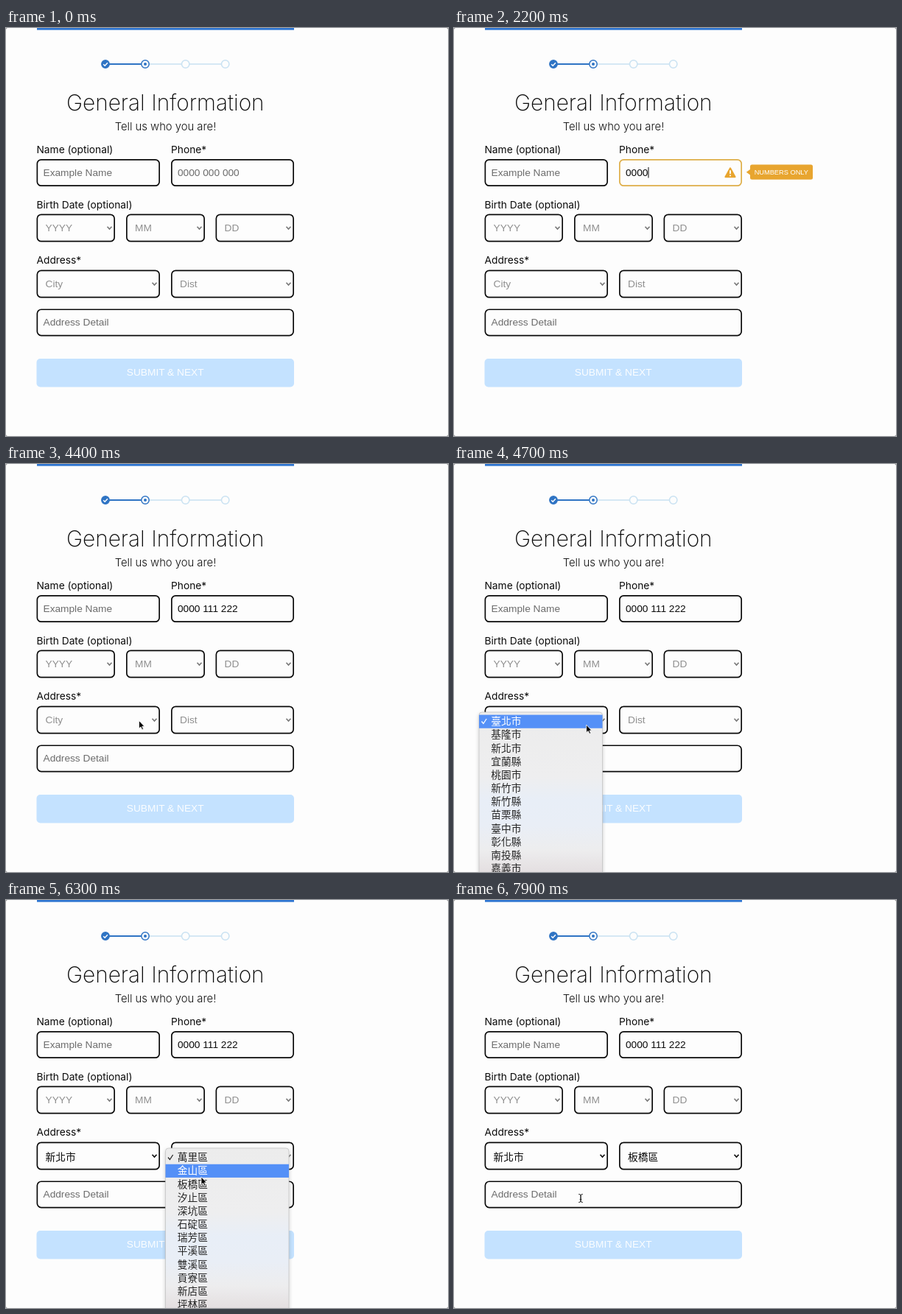
Recreate the animation shown at these times as an HTML page. Size 600 by 554 pixels, loop 8 s.

```html
<!DOCTYPE html>
<html lang="en">
<head>
<meta charset="utf-8">
<title>General Information form</title>
<style>
  html, body { margin: 0; width: 100%; height: 100%; overflow: hidden; background: #fdfdfd; }
  svg { display: block; width: 600px; height: 554px; }
  text { font-family: "Liberation Sans", Arial, "Noto Sans CJK TC", sans-serif; font-size: 13.7px; white-space: pre; }
  .label { font-family: Inter, sans-serif; font-size: 13.75px; fill: #0a0a0a; }
  .title { font-family: Inter, sans-serif; font-size: 29.8px; font-weight: 200; fill: #0a0a0a; }
  .sub { font-family: Inter, sans-serif; font-size: 14.8px; font-weight: 300; fill: #111; }
  .mid { text-anchor: middle; }
  .cjk { font-family: "Noto Sans CJK TC", "Noto Sans CJK", sans-serif; }
</style>
</head>
<body>
<svg id="stage" viewBox="0 0 600 554"></svg>
<script>
const LOOP = 8000, STEP = 100;
const BLUE = '#2f74c4', PALE = '#c9e2f2', AMBER = '#e8a52f';
const HINT = '#6c6c6c', FAINT = '#8f8f8f', INK = '#0a0a0a';
const ROW = 18.15, LIST_TOP = 340.6;
const PHONE = '0000 111 222';
const CITIES = '臺北市 基隆市 新北市 宜蘭縣 桃園市 新竹市 新竹縣 苗栗縣 臺中市 彰化縣 南投縣 嘉義市'.split(' ');
const DISTRICTS = '萬里區 金山區 板橋區 汐止區 深坑區 石碇區 瑞芳區 平溪區 雙溪區 貢寮區 新店區 坪林區'.split(' ');
const stage = document.getElementById('stage');

function add(tag, attrs, parent = stage) {
  const el = document.createElementNS('http://www.w3.org/2000/svg', tag);
  return parent.appendChild(set(el, attrs));
}
function set(el, attrs) {
  for (const k in attrs) el.setAttribute(k, attrs[k]);
  return el;
}
function write(text, x, y, attrs, parent) {
  const el = add('text', { x, y, ...attrs }, parent);
  el.textContent = text;
  return el;
}
function show(el, visible) { el.setAttribute('visibility', visible ? 'visible' : 'hidden'); }

function field(x, y, w, h = 37) {
  return add('rect', {
    x: x + .85, y: y + .85, width: w - 1.7, height: h - 1.7, rx: 5.5,
    fill: '#fdfdfd', stroke: INK, 'stroke-width': 1.7
  });
}
function input(x, y, w, hint) {
  const box = field(x, y, w);
  return { box, text: write(hint, x + 9, y + 22.7, { fill: HINT }) };
}
function select(x, y, w, hint) {
  field(x, y, w, 38);
  const text = write(hint, x + 12, y + 23.5, { fill: FAINT });
  const arrow = add('path', {
    d: `M${x + w - 10.5} ${y + 17.3}l3 3.2l3-3.2`,
    fill: 'none', stroke: '#777', 'stroke-width': 1.6
  });
  return {
    update(value) {
      text.textContent = value || hint;
      set(text, { fill: value ? INK : FAINT, class: value ? 'cjk' : '', y: y + (value ? 25.5 : 23.5) });
      arrow.setAttribute('stroke', value ? INK : '#777');
    }
  };
}

function menu(x, items) {
  const g = add('g', {});
  add('rect', { x, y: 337, width: 167.5, height: 240, rx: 4, fill: 'url(#menuFill)', stroke: '#bdbdbd', 'stroke-width': .7, filter: 'url(#soft)' }, g);
  const bar = add('rect', { x, width: 167.5, height: ROW, fill: '#5490f7' }, g);
  const tick = add('path', { d: `M${x + 3.5} 349.5l2.4 3l4.2-6.5`, fill: 'none', 'stroke-width': 1.3 }, g);
  const rows = items.map((name, i) =>
    write(name, x + 16.3, LIST_TOP + i * ROW + 13.7, { class: 'cjk' }, g));
  return {
    update(opacity, y) {
      show(g, opacity > 0);
      g.setAttribute('opacity', opacity);
      const active = Math.max(0, Math.floor((y - LIST_TOP) / ROW));
      bar.setAttribute('y', LIST_TOP + active * ROW);
      rows.forEach((row, i) => row.setAttribute('fill', i === active ? '#fff' : '#262626'));
      tick.setAttribute('stroke', active ? '#262626' : '#fff');
    }
  };
}

// Page
add('defs', {}).innerHTML = `
  <linearGradient id="menuFill" x1="0" y1="337" x2="0" y2="577" gradientUnits="userSpaceOnUse">
    <stop offset="0" stop-color="#ececec"/><stop offset=".36" stop-color="#eeeeef"/>
    <stop offset=".5" stop-color="#e8eef7"/><stop offset=".64" stop-color="#e9eef6"/>
    <stop offset=".78" stop-color="#ededee"/><stop offset=".9" stop-color="#e4dfe1"/>
  </linearGradient>
  <filter id="soft" x="-10%" y="-10%" width="120%" height="120%">
    <feDropShadow dx="0" dy="2" stdDeviation="2.5" flood-opacity=".2"/>
  </filter>`;
add('rect', { width: 600, height: 554, fill: '#8c8c8c' });
add('rect', { width: 600, height: 554, rx: 2.5, fill: '#fdfdfd' });
add('rect', { x: 42, width: 349, height: 2.7, fill: '#2f76d2' });

// Progress steps
add('path', { d: 'M189 49H298', stroke: PALE, 'stroke-width': 1.6 });
add('path', { d: 'M135 49H189', stroke: BLUE, 'stroke-width': 1.8 });
[135, 189, 243.7, 297.7].forEach((cx, i) => add('circle', {
  cx, cy: 49, r: 5.2, fill: i ? '#fdfdfd' : BLUE, stroke: i < 2 ? BLUE : PALE, 'stroke-width': 1.5
}));
add('path', { d: 'M132.2 49.2l2 2l3.7-4', fill: 'none', stroke: '#fff', 'stroke-width': 1.5 });
add('circle', { cx: 189, cy: 49, r: 2, fill: BLUE });

write('General Information', 216.3, 112, { class: 'title mid' });
write('Tell us who you are!', 216.5, 138.5, { class: 'sub mid' });
[['Name (optional)', 41.5, 169.5], ['Phone*', 224, 169.5], ['Birth Date (optional)', 41.5, 244.7], ['Address*', 41.5, 320]]
  .forEach(([name, x, y]) => write(name, x, y, { class: 'label' }));

input(41.5, 178, 167.5, 'Example Name');
const phone = input(224, 178, 167, '');
select(41.5, 252.5, 106.5, 'YYYY');
select(163, 252.5, 107, 'MM');
select(284.5, 252.5, 106.5, 'DD');
const city = select(41.5, 328.5, 167.5, 'City');
const district = select(224, 328.5, 167, 'Dist');
input(41.5, 381.4, 349.5, 'Address Detail');
add('rect', { x: 41.5, y: 449, width: 349.5, height: 38.5, rx: 5, fill: '#c4e2ff' });
write('SUBMIT & NEXT', 216.2, 472.3, { class: 'mid', fill: '#fbfdff' });

const caret = add('path', { stroke: INK, 'stroke-width': 1 });
const warning = add('g', {});
add('path', { d: 'M375 190.3L381.6 202.2H368.4Z', fill: AMBER, stroke: AMBER, 'stroke-width': 2, 'stroke-linejoin': 'round' }, warning);
add('path', { d: 'M375 193.2V198M375 199.5V201.3', stroke: '#fff', 'stroke-width': 1.8 }, warning);
add('path', { d: 'M396.8 195.7L403 191.2V200.2Z', fill: AMBER }, warning);
add('rect', { x: 402, y: 185.4, width: 85, height: 20.4, rx: 2.5, fill: AMBER }, warning);
write('NUMBERS ONLY', 444.3, 199, { class: 'mid', fill: '#fff', style: 'font-size:9.25px' }, warning);

const cityMenu = menu(34, CITIES), districtMenu = menu(216.5, DISTRICTS);

const pointer = add('path', { d: 'M0 0V10.6L2.5 8.4L4.2 12.2L6 11.4L4.3 7.8H7.4Z', fill: '#000', stroke: '#fff', 'stroke-width': .8 });
const beam = add('path', { d: 'M-2.8-5.5Q0-5.5 0-4V4Q0 5.5-2.8 5.5M2.8-5.5Q0-5.5 0-4V4Q0 5.5 2.8 5.5M-1.3 1.5H1.3', fill: 'none', stroke: '#222', 'stroke-width': 1 });

// Motion: [time, x, y]
const PATH = [
  [100, 285, 560], [800, 300, 198], [3300, 300, 198], [3600, 285, 240], [4300, 180.5, 348.5],
  [4600, 180.5, 348.5], [5000, 175, 384.5], [5400, 175, 384.5], [5900, 262, 349], [6100, 262, 350],
  [6300, 265, 376], [6600, 265, 384.5], [7200, 265, 384.5], [7800, 172, 405], [8000, 172, 405]
];
const clamp = v => Math.min(1, Math.max(0, v));

function mouseAt(t) {
  const i = Math.max(1, PATH.findIndex(p => p[0] > t));
  const [t0, x0, y0] = PATH[i - 1], [t1, x1, y1] = PATH[i];
  const p = clamp((t - t0) / (t1 - t0)), e = p * p * (3 - 2 * p);
  return [x0 + (x1 - x0) * e, y0 + (y1 - y0) * e];
}
const menuOpacity = (t, open, close) => t < open ? 0 : clamp(1 - (t - close) / 300);

function drawPhone(t) {
  const focused = t >= 1000 && t < 3700;
  const count = t < 1500 ? 0 : Math.min(10, Math.floor((t - 1500) / 200) + 1);
  const invalid = count > 0 && count < 10;
  const digits = PHONE.replace(/ /g, '').slice(0, count);
  phone.text.textContent = count === 10 ? PHONE : digits || '0000 000 000';
  phone.text.setAttribute('fill', count ? INK : HINT);
  phone.box.setAttribute('stroke', invalid ? '#deae48' : focused ? BLUE : INK);
  const x = 233.5 + (count ? phone.text.getComputedTextLength() : 0);
  caret.setAttribute('d', `M${x} 189V203.5`);
  show(caret, focused);
  show(warning, invalid);
}

function render(t) {
  const [x, y] = mouseAt(t);
  drawPhone(t);
  city.update(t >= 5400 && CITIES[2]);
  district.update(t >= 7100 && DISTRICTS[2]);
  cityMenu.update(menuOpacity(t, 4500, 5200), y);
  districtMenu.update(t < 7200 ? menuOpacity(t, 6000, 7000) : 0, y);

  const visible = t >= 100 && (t < 1500 || t >= 3300);
  const overPhone = x > 224 && y > 178 && y < 215;
  const overDetail = t >= 7200 && y > 381 && y < 418;
  const typing = overPhone || overDetail;
  show(pointer, visible && !typing);
  show(beam, visible && typing);
  for (const el of [pointer, beam]) el.setAttribute('transform', `translate(${x} ${y})`);
}

const start = performance.now();
function tick(now) {
  const t = Math.max(0, now - start) % LOOP;
  render(Math.floor(t / STEP) * STEP);
  requestAnimationFrame(tick);
}
render(0);
requestAnimationFrame(tick);
</script>
</body>
</html>
```
